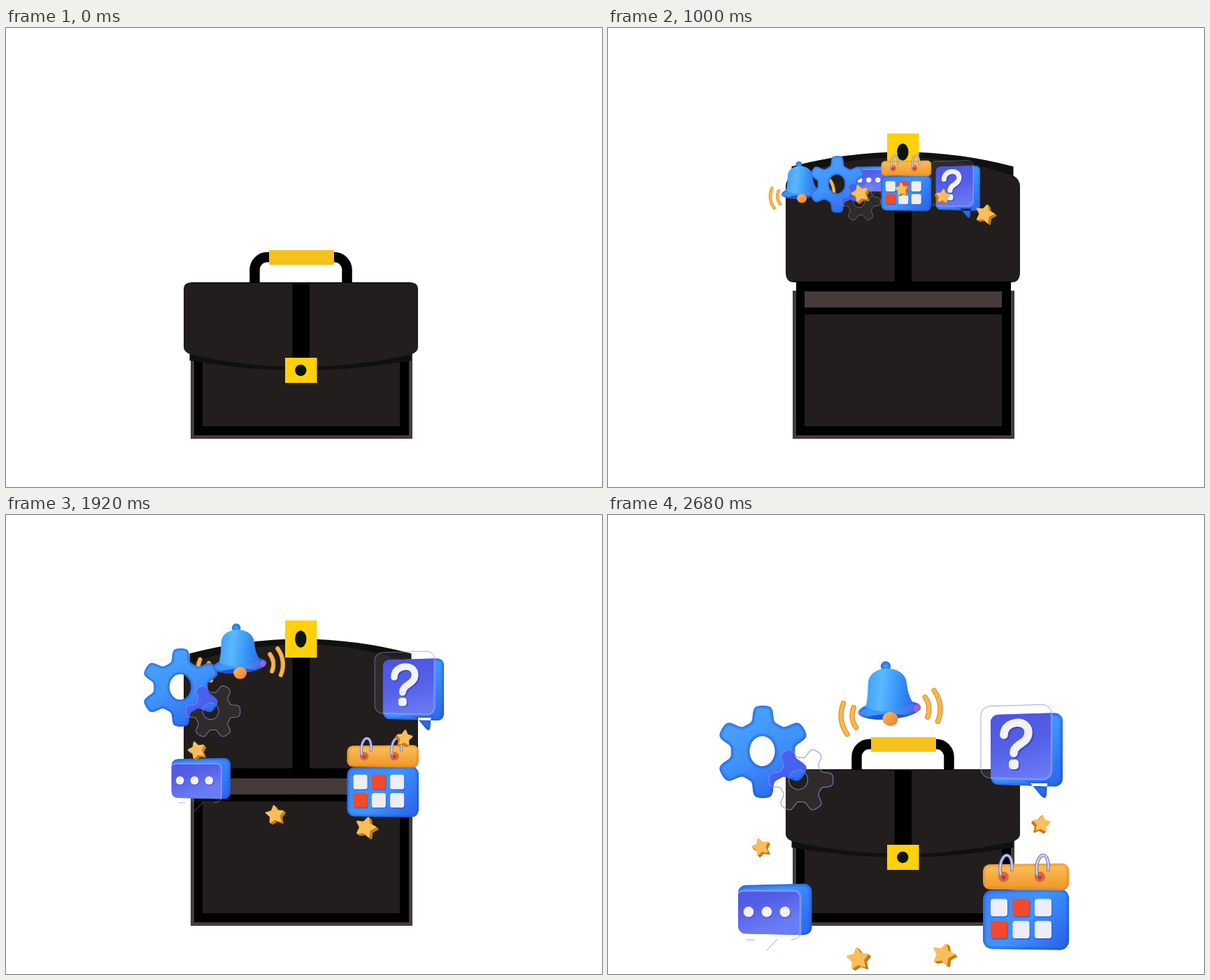
Recreate the animation shown at these times as an HTML page with a canvas. Size 852x657 px, loop 3880 ms.

```html
<!DOCTYPE html>
<html lang="en">
<head>
<meta charset="utf-8">
<title>Briefcase</title>
<style>
html, body { margin: 0; width: 100%; height: 100%; overflow: hidden; background: #fff; }
canvas { display: block; width: 100vw; height: 100vh; }
</style>
</head>
<body>
<canvas id="stage" width="852" height="657"></canvas>
<script>
const ctx = document.getElementById('stage').getContext('2d');
const LOOP = 3880, STEP = 40, HINGE = 364, OPEN = -1.48, TAU = 2 * Math.PI;

const clamp = x => Math.min(1, Math.max(0, x));
const span = (t, a, b) => clamp((t - a) / (b - a));
const mix = (a, b, p) => a + (b - a) * p;
const sineInOut = x => (1 - Math.cos(Math.PI * x)) / 2;
const cubicInOut = x => x < .5 ? 4 * x ** 3 : 1 - 4 * (1 - x) ** 3;

function at(x, y, draw) {
  ctx.save();
  ctx.translate(x, y);
  draw();
  ctx.restore();
}
function fill(path, color, rule = 'nonzero') {
  ctx.fillStyle = color;
  ctx.fill(path, rule);
}
function line(path, color, width) {
  ctx.strokeStyle = color;
  ctx.lineWidth = width;
  ctx.stroke(path);
}
function box(x1, y1, x2, y2, color) {
  ctx.fillStyle = color;
  ctx.fillRect(x1, y1, x2 - x1, y2 - y1);
}
function oval(x, y, rx, ry = rx, turn = 0, from = 0, to = TAU) {
  const p = new Path2D();
  p.ellipse(x, y, rx, ry, turn, from, to);
  return p;
}
// Rounded box whose right side may be taller than its left
function slab(x1, y1, x2, y2, r, flare = 0) {
  const p = new Path2D(), m = (x1 + x2) / 2;
  p.moveTo(m, y1 - flare / 2);
  p.arcTo(x2, y1 - flare, x2, y2, r);
  p.arcTo(x2, y2 + flare, m, y2 + flare / 2, r);
  p.arcTo(x1, y2, x1, y1, r);
  p.arcTo(x1, y1, m, y1 - flare / 2, r);
  p.closePath();
  return p;
}
function grad(x1, y1, x2, y2, ...colors) {
  const g = ctx.createLinearGradient(x1, y1, x2, y2);
  colors.forEach((c, i) => g.addColorStop(i / (colors.length - 1), c));
  return g;
}
function clipped(path, draw, rule = 'nonzero') {
  ctx.save();
  ctx.clip(path, rule);
  draw();
  ctx.restore();
}
// Filled shape with softly darkened edges
function puffy(path, paint, edge, rule) {
  clipped(path, () => {
    fill(path, paint, rule);
    ctx.globalAlpha = .2;
    for (let w = 9; w > 0; w -= 3) line(path, edge, w);
  }, rule);
}

function cog(cx, cy, rx, ry, phase, hole) {
  const p = new Path2D();
  for (let a = 0; a < TAU; a += TAU / 180) {
    const r = .835 + .165 * Math.tanh(2.3 * Math.cos(6 * (a - phase)));
    p.lineTo(cx + rx * r * Math.cos(a), cy + ry * r * Math.sin(a));
  }
  p.closePath();
  p.addPath(hole);
  return p;
}

// Briefcase
const handle = new Path2D('M355.5 364V346A18 18 0 0 1 373.5 328H469.5A18 18 0 0 1 487.5 346V364');
const flap = new Path2D('M266 364H577Q589 364 589 374V457Q589 463 580 467Q421 503 263 467Q254 463 254 457V374Q254 364 266 364Z');
const trim = new Path2D('M262.5 440H579.5V476Q421 504 262.5 476Z');

function drawBody() {
  line(handle, '#000', 14.5);
  box(376, 318, 469, 339, '#f4c21a');
  box(264, 376, 581, 588, '#443b3a');
  box(269, 364, 576, 583, '#000');
  box(281, 377, 563, 400, '#463b3a');
  box(281, 410, 563, 570, '#221e1d');
}
function drawFlap(s) {
  ctx.save();
  ctx.translate(0, HINGE);
  ctx.scale(1, s);
  ctx.translate(0, -HINGE);
  fill(trim, '#111010');
  fill(flap, '#221e1d');
  box(265, 364, 578, 365, '#000');
  box(409.5, 364, 434, 474, '#000');
  box(399, 472, 444.5, 508, '#ffd00c');
  fill(oval(421.3, 490, 8.2), '#0b1510');
  ctx.restore();
}

// Icons, drawn at their resting places
const BLUE = ['#3c84f2', '#3f94fc', '#2763ea'], DEEP = '#1d50d2';
const VIOLET = ['#4c54dc', '#5560e8', '#6a7cf4'];
const GLASS = 'rgba(132,140,222,.8)', MIST = 'rgba(255,255,255,.06)';

function drawBubble(back, glass, x1, y1, x2, y2) {
  puffy(back, grad(x1, y1, x2, y2, ...BLUE), DEEP);
  fill(glass, MIST);
  clipped(back, () => {
    fill(glass, grad(x1, y1, x1 + 25, y2, ...VIOLET));
    line(glass, 'rgba(150,165,255,.7)', 2.5);
  });
}

const chatBack = slab(186, 530, 291.5, 599, 11, 2.5);
const chatGlass = slab(184, 538, 275, 607, 9);
const chatTail = new Path2D('M198 608H210M242 607L227 623M262 608Q276 608 276 594');

function drawChat() {
  drawBubble(chatBack, chatGlass, 186, 530, 291, 600);
  line(chatTail, GLASS, 1);
  for (let i = 0; i < 3; i++) {
    fill(oval(202 + 26 * i, 569.5, 7.4), 'rgba(50,50,160,.4)');
    fill(oval(201 + 26 * i, 568, 7.4), '#f3f1f4');
  }
}

const askBack = slab(547, 286, 650, 386, 11, 3);
askBack.addPath(new Path2D('M604 384L619 402Q626 409 627 400L628 384Z'));
const askGlass = slab(533, 274, 634, 376, 13, 3);
const askHook = new Path2D('M566 315C566 293 602 291 601 312C600 328 580 327 580 341');

function drawQuestion() {
  drawBubble(askBack, askGlass, 547, 285, 650, 388);
  line(askGlass, GLASS, 1);
  for (const [d, color] of [[2, 'rgba(45,45,150,.45)'], [0, '#f2f1f5']]) {
    at(d, d, () => {
      line(askHook, color, 11.5);
      fill(slab(573, 350, 587, 364, 5), color);
    });
  }
}

const bellCup = new Path2D('M368 275C372 262 371 250 372 240C374 213 424 213 427 240C428 252 431 261 436 269Q402 290 368 275Z');
const bellRim = oval(402.5, 279, 45, 13.5, -.09);

function drawBell() {
  for (const side of [-1, 1]) {
    const mid = side < 0 ? Math.PI - .12 : -.12;
    for (const r of [29, 45]) {
      const wave = oval(404 + 26 * side, 282.5 - 4.5 * side, r, r, 0, mid - .52, mid + .52);
      line(wave, '#e39430', 7.5);
      line(wave, '#f8b651', 5);
    }
  }
  puffy(oval(397, 216.5, 7.2), '#3a9af6', DEEP);
  puffy(bellRim, grad(358, 272, 447, 290, '#3a8ef5', '#3f9ffa', '#4a5be8'), DEEP);
  clipped(bellRim, () => {
    fill(oval(404, 293, 36, 8), '#2454d4');
    fill(oval(359, 286, 5), 'rgba(200,90,210,.5)');
    fill(oval(443, 277, 6), 'rgba(215,100,205,.6)');
  });
  fill(bellCup, grad(370, 240, 434, 247, '#41a0f7', '#5ab8ff', '#3a99f8', '#2c74ec'));
  fill(oval(403.5, 292, 11, 10), grad(395, 284, 412, 302, '#fbb35a', '#e87f30'));
}

const bigCog = cog(221.5, 339, 68, 66.5, Math.PI / 6, oval(220.5, 338, 18, 21.5));
const glassCog = cog(276, 379, 46, 47, 0, oval(272, 379, 13.5, 14));

function drawGears() {
  puffy(bigCog, grad(185, 275, 250, 405, '#4aa5fb', '#3f92fa', '#2d67ef'), DEEP, 'evenodd');
  fill(glassCog, MIST, 'evenodd');
  clipped(bigCog, () => fill(glassCog, 'rgba(75,84,242,.75)', 'evenodd'), 'evenodd');
  line(glassCog, GLASS, 1.2);
}

const calHead = slab(536, 500, 659, 536, 10, 1.5);
const calBody = slab(536, 537, 659, 621, 13, 2);

function drawCalendar() {
  puffy(calBody, grad(540, 536, 650, 624, ...BLUE), DEEP);
  puffy(calHead, grad(0, 498, 0, 536, '#ffc360', '#f6ab40', '#eb982c'), '#d98420');
  for (let i = 0; i < 6; i++) {
    const x = 547 + i % 3 * 31.5, y = i < 3 ? 549.5 : 581;
    fill(slab(x + 1, y + 1.5, x + 25, y + 26.5, 4), 'rgba(20,50,170,.45)');
    fill(slab(x, y, x + 24, y + 25, 4), i % 3 === (i < 3 ? 1 : 0) ? '#f4492a' : '#eeedf3');
  }
  for (const x of [569, 621]) {
    fill(oval(x - 3.5, 518, 7.5), '#d9693f');
    const ring = oval(x, 505, 8.5, 18, .08, Math.PI - .6, TAU + .1);
    line(ring, 'rgba(112,116,190,.85)', 5);
    line(ring, 'rgba(222,224,250,.85)', 2.4);
    fill(oval(x - 3.5, 519, 2.8), '#b23f3a');
  }
}

function drawStar(r, turn, lean) {
  const p = new Path2D();
  for (let i = 0; i < 10; i++) {
    const a = turn + i * TAU / 10, q = i % 2 ? r * .52 : r;
    p.lineTo(q * Math.sin(a), -q * Math.cos(a));
  }
  p.closePath();
  ctx.lineJoin = 'round';
  for (let k = 4; k >= 0; k--) {
    const color = k ? '#c47d12' : '#f9be5c';
    at(lean * k / 4, 3 * k / 4, () => {
      fill(p, color);
      line(p, color, 2.5);
    });
  }
}

// rest: final place; air: above the case; spread: share of the air offset kept
// inside the case; size: scale before landing
const icon = (draw, rest, air, spread, size) => ({ draw, rest, air, spread, size });

const stars = [[218, 475, 1, 3], [357, 635, .6, 4], [620, 442, .82, -3], [479, 629, .86, 4]]
  .map(([x, y, size, lean], i) => icon(
    () => at(x, y, () => drawStar(i % 2 ? 15 : 11.5, .2 * i - .3, lean)),
    [x, y], [354 + 70.5 * i, 129 + i * (12 * i - 21)], .55, size));

const icons = [
  icon(drawChat, [239, 563.5], [339, 96], -1.1, .5),
  icon(drawBell, [402.5, 255.5], [231, 104], .2, .64),
  icon(drawGears, [221, 339], [292, 109], 0, .615),
  icon(drawQuestion, [598.5, 345], [558.5, 126], 0, .615),
  icon(drawCalendar, [597.5, 560], [450.7, 111.5], -.2, .585),
  ...stars
];

function drawIcons(t) {
  const rise = cubicInOut(span(t, 600, 1320));
  const land = cubicInOut(span(t, 1320, 2440));
  ctx.save();
  if (t < 1320) {
    // The front panel hides what is still inside
    ctx.beginPath();
    ctx.rect(0, 0, 852, 400);
    ctx.clip();
  }
  ctx.lineCap = 'round';
  for (const { draw, rest, air, spread, size } of icons) {
    const deep = [mix(393, air[0], spread), 436];
    const [x, y] = rest.map((end, k) => mix(mix(deep[k], air[k], rise), end, land));
    const s = mix(size, 1, land);
    at(x, y, () => {
      ctx.scale(s, s);
      ctx.translate(-rest[0], -rest[1]);
      draw();
    });
  }
  ctx.restore();
}

function flapScale(t) {
  if (t < 2040) return mix(1, OPEN, sineInOut(span(t, 20, 600)));
  return mix(OPEN, 1, 1 - (1 - span(t, 2040, 2680)) ** 1.85);
}

function render(now) {
  const t = Math.floor((now % LOOP) / STEP) * STEP;
  box(0, 0, 852, 657, '#fff');
  drawBody();
  drawFlap(flapScale(t));
  if (t >= 760) drawIcons(t);
}

let start;
function tick(now) {
  start ??= now;
  render(now - start);
  requestAnimationFrame(tick);
}
render(0);
requestAnimationFrame(tick);
</script>
</body>
</html>
```
